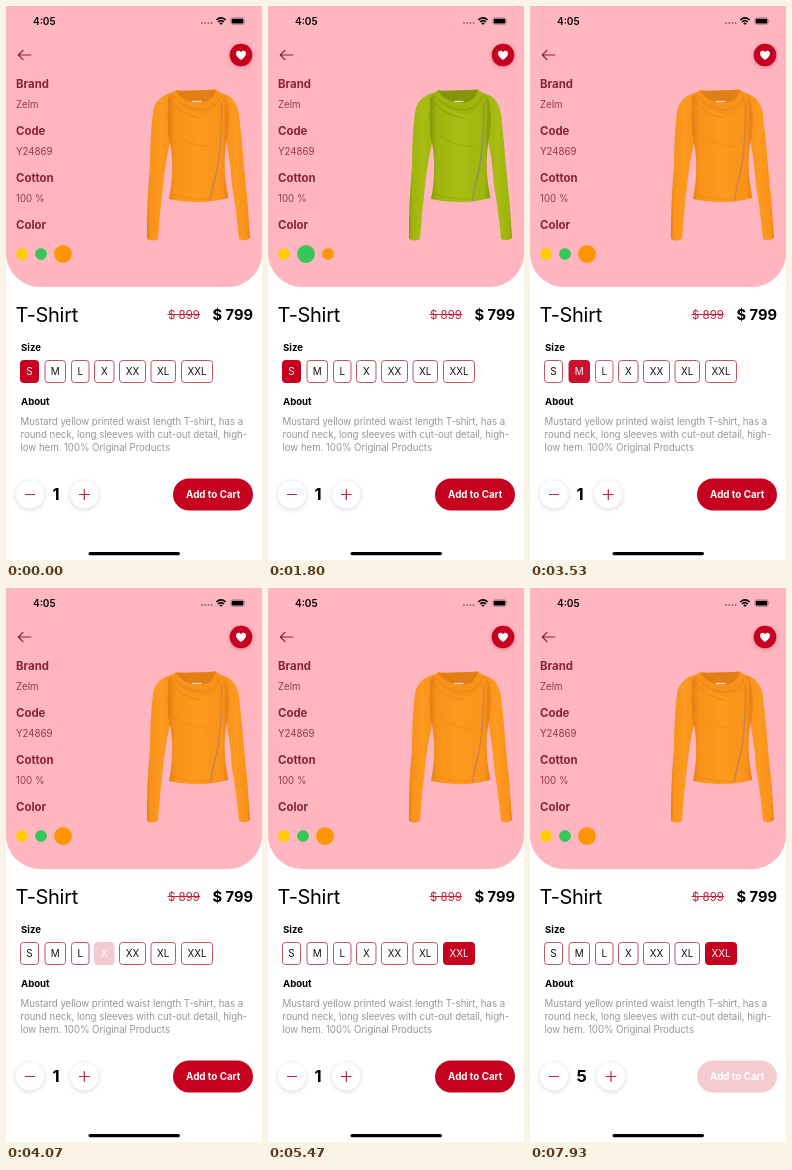
Animation of 256 by 554 pixels, one loop 8000 ms. Source, as an HTML page:

```html
<!DOCTYPE html>
<html lang="en">
<head>
<meta charset="utf-8">
<title>Product page</title>
<style>
html, body { margin: 0; width: 100%; height: 100%; overflow: hidden; background: #fff; }
svg { display: block; width: 256px; height: 554px; font-family: Inter, "Liberation Sans", sans-serif; }
.head { font-size: 11.4px; font-weight: 700; fill: #8c2038; }
.info { font-size: 9.7px; fill: #96364a; }
.label { font-size: 9.6px; font-weight: 700; }
.about { font-size: 9.7px; letter-spacing: -.06px; fill: #979797; }
.line { fill: none; stroke-linecap: round; stroke-linejoin: round; }
.size rect { fill: #fff; stroke: #c25464; }
.size text { font-size: 9.9px; text-anchor: middle; fill: #111; }
.size.on rect { fill: #c6011f; stroke: #c6011f; }
.size.on text { fill: #fff; }
.round { fill: #fff; filter: drop-shadow(0 1px 2.5px rgba(0, 0, 0, .16)); }
.fold { fill: none; stroke: var(--dark); stroke-linecap: round; }
</style>
</head>
<body>
<svg id="stage" viewBox="0 0 256 554">
  <defs>
    <linearGradient id="cloth">
      <stop offset="0" stop-color="var(--dark)"/>
      <stop offset=".12" stop-color="var(--main)"/>
      <stop offset=".5" stop-color="var(--light)"/>
      <stop offset=".9" stop-color="var(--main)"/>
      <stop offset="1" stop-color="var(--dark)"/>
    </linearGradient>
  </defs>

  <path d="M0 0H256V247A34 34 0 0 1 222 281H34A34 34 0 0 1 0 247Z" fill="#ffb6c1"/>

  <!-- status bar -->
  <text x="27" y="18.5" font-size="10" font-weight="600">4:05</text>
  <g fill="#8d626a">
    <circle cx="196" cy="17" r=".9"/><circle cx="199.2" cy="17" r=".9"/>
    <circle cx="202.4" cy="17" r=".9"/><circle cx="205.6" cy="17" r=".9"/>
  </g>
  <path d="M210.3 14Q215 9.8 219.7 14M212 16Q215 13.3 218 16" fill="none" stroke="#000" stroke-width="1.5"/>
  <path d="M213.2 17.1Q215 15.7 216.8 17.1L215 19Z"/>
  <rect x="224.8" y="11.8" width="13.4" height="6.6" rx="1.9" fill="none" stroke="#8d626a" stroke-width=".6"/>
  <rect x="225.7" y="12.7" width="11.6" height="4.8" rx="1.1"/>
  <path d="M238.9 14V16.2Q239.9 15.1 238.9 14" fill="#8d626a"/>

  <path class="line" d="M24.8 49H12.3M17 44.3L12.3 49L17 53.7" stroke="#8c2038" stroke-width="1.2"/>
  <circle cx="235" cy="49" r="11.3" fill="#c6011f" style="filter:drop-shadow(0 1px 2px rgba(90,0,20,.3))"/>
  <path d="M235 54C231.5 51.3 230 49.5 230 47.5C230 44.6 233.7 43.8 235 46.4C236.3 43.8 240 44.6 240 47.5C240 49.5 238.5 51.3 235 54Z" fill="#fff"/>

  <text class="head" x="10" y="82">Brand</text>
  <text class="info" x="10" y="102">Zelm</text>
  <text class="head" x="10" y="129">Code</text>
  <text class="info" x="10" y="149">Y24869</text>
  <text class="head" x="10" y="175.5">Cotton</text>
  <text class="info" x="10" y="195.5">100 %</text>
  <text class="head" x="10" y="222.5">Color</text>
  <g id="dots"></g>

  <g id="shirt">
    <path fill="url(#cloth)" d="M168 86C156 89 149 94 147 106Q144 130 144 160Q140.500 200 141 233Q146 236 152 233Q154 205 157 180Q160 150 166 130Z"/>
    <path fill="url(#cloth)" d="M215 87C226 90 231 96 233 108Q236 135 238 160Q242 195 244 232Q239 236 233 233Q230 202 226 180Q224 150 219 130Z"/>
    <path fill="url(#cloth)" d="M162 92L170 84Q190 87 209 83L219 90Q224 100 222 128Q215 158 222.500 192Q192 200 163 193Q170 158 162 128Z"/>
    <path fill="var(--dark)" d="M170 85Q190 84 210 84Q207 97 192 98Q176 95 170 85Z"/>
    <path fill="var(--main)" d="M165 88L169 85Q178 97 194 97Q207 96 210 84L217 89Q215 107 196 109Q175 105 165 88Z"/>
    <path class="fold" d="M166 89Q178 104 197 104Q211 102 214 91M163 92Q173 109 195 112" stroke-width=".9" opacity=".8"/>
    <path class="fold" d="M161 108Q165 124 164 138M221 108Q218 124 219 138M165 188Q184 194 203 193M172 130Q188 142 206 140" stroke-width=".9" opacity=".5"/>
    <path d="M186 95.500H195.500" stroke="#fff" stroke-width="1.300" opacity=".7"/>
    <path class="line" d="M215.500 97C216 125 214 150 210 168Q206 182 204.500 194" stroke="var(--zip)" stroke-width="1.400"/>
  </g>

  <text x="9.5" y="315.5" font-size="20" letter-spacing="-.3">T-Shirt</text>
  <text x="162" y="312.5" font-size="11.5" fill="#c6203a">$ 899</text>
  <path d="M161.500 308.500H194" stroke="#c6203a"/>
  <text x="247" y="313.5" font-size="14.7" font-weight="700" text-anchor="end">$ 799</text>

  <text class="label" x="15" y="345">Size</text>
  <g id="sizes"></g>
  <text class="label" x="15" y="399">About</text>
  <text class="about" x="14.5" y="418.5">Mustard yellow printed waist length T-shirt, has a</text>
  <text class="about" x="14.5" y="431.7">round neck, long sleeves with cut-out detail, high-</text>
  <text class="about" x="14.5" y="445">low hem. 100% Original Products</text>

  <circle class="round" cx="24" cy="488.5" r="14"/>
  <path class="line" d="M19.4 488.500H28.600" stroke="#b8243e" stroke-width="1.2"/>
  <text id="count" x="46.5" y="494" font-size="16.5" font-weight="700">1</text>
  <g id="plus">
    <circle class="round" r="14"/>
    <path id="cross" class="line" d="M-4.900 0H4.900M0 -4.900V4.900" stroke="#b8243e" stroke-width="1.2"/>
  </g>
  <g id="cart">
    <rect x="167" y="472.5" width="80" height="32" rx="16" fill="#c6011f"/>
    <text x="207.2" y="491.8" font-size="9.8" font-weight="700" fill="#fff" text-anchor="middle">Add to Cart</text>
  </g>
  <rect x="82.5" y="546" width="91.5" height="3.2" rx="1.6"/>
</svg>
<script>
const LOOP = 8000;
const $ = id => document.getElementById(id);

function add(parent, tag, attrs) {
  const el = document.createElementNS('http://www.w3.org/2000/svg', tag);
  for (const key in attrs) el.setAttribute(key, attrs[key]);
  return parent.appendChild(el);
}

// Taps are [press, release] times in ms.
const colors = [
  { dot: '#ffcc00', main: '#efbb0a', dark: '#d6a004', light: '#f8c91f', zip: '#b99a55', taps: [[380, 740]] },
  { dot: '#34c759', main: '#9fb40c', dark: '#849608', light: '#a9be14', zip: '#84956a', taps: [[1160, 1540]] },
  { dot: '#ff9500', main: '#f99218', dark: '#e27f14', light: '#fd9a20', zip: '#c98352', taps: [[2230, 2470]] }
];
const sizes = [
  { name: 'S', x: 14.5, w: 18, taps: [] },
  { name: 'M', x: 39, w: 20.5, taps: [[3160, 3330]] },
  { name: 'L', x: 65.5, w: 17.5, taps: [[3500, 3690]] },
  { name: 'X', x: 88.5, w: 19.5, taps: [[3780, 4060]] },
  { name: 'XX', x: 113.5, w: 26, taps: [[4230, 4500]] },
  { name: 'XL', x: 145, w: 24.5, taps: [[4500, 4790]] },
  { name: 'XXL', x: 175.5, w: 31, taps: [[4840, 5200]] }
];
const plusTaps = [[6090, 6270], [6380, 6670], [6780, 7070], [7180, 7470]];
const cartTaps = [[7785, LOOP]];

for (const c of colors) c.el = add($('dots'), 'circle', { cy: 248, fill: c.dot, stroke: c.dot, 'stroke-opacity': .4 });
for (const s of sizes) {
  s.el = add($('sizes'), 'g', { class: 'size' });
  add(s.el, 'rect', { x: s.x, y: 354.5, width: s.w, height: 22, rx: 3 });
  add(s.el, 'text', { x: s.x + s.w / 2, y: 369.3 }).textContent = s.name;
}

const ease = p => p < .5 ? 2 * p * p : 1 - 2 * (1 - p) ** 2;

// Opacity of a touchable: dims on press, recovers on release, from wherever it was.
function touch(taps, t) {
  let from = 1, to = 1, start = 0, len = 1;
  const at = x => from + (to - from) * ease(Math.min(1, (x - start) / len));
  const go = (x, target, ms) => {
    if (t < x) return;
    from = at(x);
    to = target;
    start = x;
    len = ms;
  };
  for (const [press, release] of taps) {
    go(press, .2, 150);
    go(release, 1, 250);
  }
  return at(t);
}

function picked(items, first, t) {
  return items.reduce((cur, item) => item.taps.some(tap => t >= tap[1]) ? item : cur, first);
}

function draw(t) {
  const color = picked(colors, colors[2], t);
  let x = 10;
  for (const c of colors) {
    const w = c === color ? 18 : 12;
    c.el.setAttribute('cx', x + w / 2);
    c.el.setAttribute('r', w / 2 - .3);
    c.el.style.opacity = touch(c.taps, t);
    x += w + 7;
  }
  for (const key of ['main', 'dark', 'light', 'zip']) $('stage').style.setProperty('--' + key, color[key]);

  const size = picked(sizes, sizes[0], t);
  for (const s of sizes) {
    s.el.classList.toggle('on', s === size);
    s.el.style.opacity = touch(s.taps, t);
  }

  const count = 1 + plusTaps.filter(tap => t >= tap[1]).length;
  $('count').textContent = count;
  $('plus').setAttribute('transform', `translate(${count > 1 ? 81 : 78.3} 488.5)`);
  $('cross').style.opacity = touch(plusTaps, t);
  $('cart').style.opacity = touch(cartTaps, t);
}

const origin = performance.now();
function tick() {
  draw((performance.now() - origin) % LOOP);
  requestAnimationFrame(tick);
}
tick();
</script>
</body>
</html>
```
